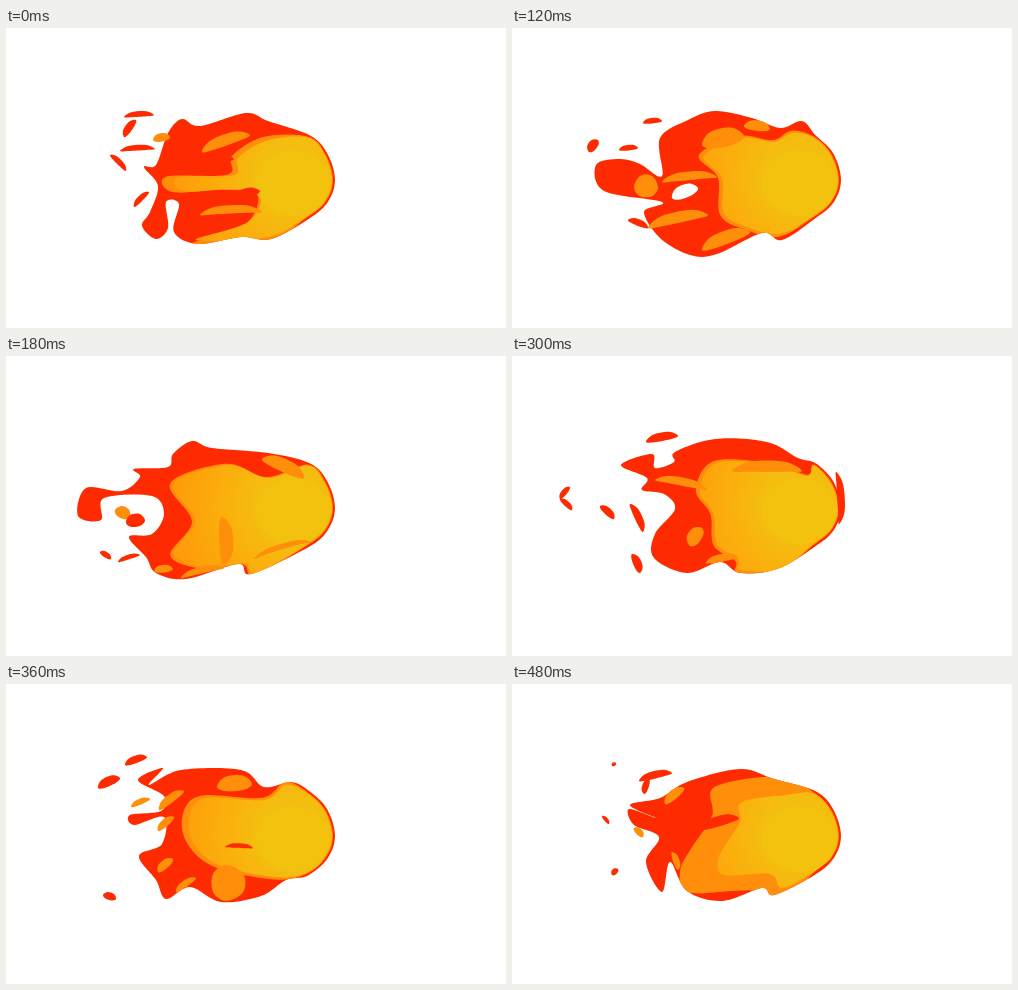
Write an HTML page that moves like this. It is 500 px wide and 300 px high and loops after 0.54 s.

```html
<!DOCTYPE html>
<html lang="en">
<head>
<meta charset="utf-8">
<title>Fireball</title>
<style>
html, body { margin: 0; width: 100%; height: 100%; overflow: hidden; background: #fff; }
svg { display: block; width: 100%; height: 100%; }
</style>
</head>
<body>
<svg viewBox="0 0 500 300">
  <defs>
    <radialGradient id="glow" gradientUnits="userSpaceOnUse" cx="288" cy="150" r="118">
      <stop offset=".3" stop-color="#f4be10"/>
      <stop offset=".6" stop-color="#fbaf0c"/>
      <stop offset="1" stop-color="#fe9d0a"/>
    </radialGradient>
  </defs>
  <g id="fire"></g>
</svg>
<script>
const STEP = 60;
const FILL = { r: '#ff2b00', o: '#ff8f0a', a: 'url(#glow)', y: '#f3c20f', w: '#fff' };
const HEART = [290, 152];

const lerp = (a, b, k) => a + (b - a) * k;
const mix = (p, q, k) => p.map((v, j) => lerp(v, q[j], k));

// Point on the rounded front that all layers share.
function nose(deg, inset) {
  const t = deg * Math.PI / 180;
  const ry = deg < 0 ? 57 : 49;
  return [262 + (67 - inset) * Math.cos(t), 152 + (ry - inset) * Math.sin(t)];
}

function points(str) {
  const n = str.split(' ').map(Number);
  return n.flatMap((x, i) => i % 2 ? [] : [[x, n[i + 1]]]);
}

// Front plus the trailing points, which run from top to bottom.
const outline = (trail, inset) => [
  ...[0, -28, -52].map(d => nose(d, inset)),
  ...trail,
  ...[54, 28].map(d => nose(d, inset))
];

// Closed smooth curve through the points.
function curve(pts) {
  const n = pts.length, at = i => pts[(i + n) % n];
  let d = 'M' + pts[0];
  for (let i = 0; i < n; i++) {
    const [p, a, b, q] = [at(i - 1), at(i), at(i + 1), at(i + 2)];
    const c1 = a.map((v, j) => v + (b[j] - p[j]) / 6);
    const c2 = b.map((v, j) => v - (q[j] - a[j]) / 6);
    d += `C${c1} ${c2} ${b}`;
  }
  return d + 'Z';
}

// Leaf from one point to another, slightly arched.
function leaf(x1, y1, x2, y2, w) {
  const dx = x2 - x1, dy = y2 - y1, len = Math.hypot(dx, dy);
  const nx = -dy / len, ny = dx / len;
  const side = (k, off) => [x1 + dx * k + nx * off, y1 + dy * k + ny * off];
  const arch = -len * .06;
  return [
    [x1, y1], side(.25, arch - w * .42), side(.75, arch - w * .42),
    [x2, y2], side(.75, arch + w * .42), side(.25, arch + w * .42)
  ];
}

// Evenly spaced points along a closed outline.
function resample(pts, count) {
  const ring = [...pts, pts[0]], len = [0];
  for (let i = 1; i < ring.length; i++) {
    len[i] = len[i - 1] + Math.hypot(ring[i][0] - ring[i - 1][0], ring[i][1] - ring[i - 1][1]);
  }
  return Array.from({ length: count }, (_, k) => {
    const s = len[len.length - 1] * k / count;
    const i = len.findIndex(l => l > s);
    return mix(ring[i - 1], ring[i], (s - len[i - 1]) / (len[i] - len[i - 1]));
  });
}

function halfway(a, b) {
  const q = resample(b, 90);
  return resample(a, 90).map((p, i) => mix(p, q[i], .5));
}

// Loose flakes trail off to the left and shrink.
function drift(pts) {
  const mid = mix(pts[0], pts[3], .5);
  if (mid[0] > 160) return pts;
  return pts.map(p => mix(mid, p, .85)).map(([x, y]) => [x - 6, y]);
}

const shape = ([fill, pts]) => `<path fill="${FILL[fill]}" d="${curve(pts)}"/>`;

function draw({ body, rim, glow, licks }) {
  return `<clipPath id="edge"><path d="${curve(body)}"/></clipPath>` +
    shape(['r', body]) +
    `<g clip-path="url(#edge)">${shape(['o', rim])}${shape(['a', glow])}` +
    `<ellipse cx="287" cy="155" rx="37" ry="33" fill="${FILL.y}"/></g>` +
    licks.map(shape).join('');
}

const poses = [];

// spread: how far the orange rim reaches beyond the glow
function pose(spread, body, glow, licks) {
  const inner = points(glow);
  poses.push({
    body: outline(points(body), 0),
    rim: outline(inner.map(p => mix(HEART, p, spread)), 2),
    glow: outline(inner, 3),
    licks: licks.split(', ').map(s => {
      const [fill, ...n] = s.split(' ');
      return [fill, leaf(...n.map(Number))];
    })
  });
}

pose(1.1,
  '262 93 240 85 194 98 176 91 162 105 150 137 138 139 152 158 144 184 136 198 150 211 162 200 160 174 173 176 168 204 192 216 235 209 265 211',
  '260 113 232 130 228 147 172 149 178 163 225 161 255 166 242 194 190 212 262 209',
  'r 218 177 254 163 12, r 180 143 228 131 10, o 194 187 256 184 9, o 196 124 244 107 12, o 147 112 164 109 9, r 118 89 148 87 6, r 118 109 130 92 8, r 114 123 149 121 6, r 104 127 120 143 6, r 128 179 143 164 6');

pose(1.05,
  '290 93 268 100 240 90 203 83 176 92 148 110 150 148 128 136 108 131 84 137 92 163 150 174 132 184 148 210 178 227 205 226 250 205 270 212',
  '280 105 262 114 230 110 192 128 210 150 212 185 235 199 268 206',
  'w 160 170 186 160 14, o 122 159 146 160 24, o 150 154 205 149 9, o 190 117 232 108 20, o 232 98 258 101 11, o 136 200 196 187 12, o 190 222 238 204 14, r 131 95 150 93 6, r 77 124 86 112 10, r 107 122 126 120 6, r 116 192 136 200 7');

pose(1.03,
  '262 97 206 92 186 85 167 98 162 111 128 113 134 121 116 135 80 132 72 160 95 164 98 142 146 140 158 158 146 178 123 181 140 201 150 217 180 223 232 208 245 218',
  '262 122 222 109 168 128 189 165 168 198 200 211 238 207 250 217',
  'o 109 154 124 161 13, r 120 167 139 164 14, o 216 161 218 209 15, o 248 203 305 186 6, o 256 103 298 122 14, o 148 215 167 213 8, o 175 222 218 212 7, r 94 196 105 203 6, r 112 206 134 199 5');

pose(1.04,
  '286 102 255 86 203 83 163 96 162 106 143 112 140 98 109 109 135 122 130 134 152 138 163 153 143 178 142 202 175 217 208 206 228 217 265 213',
  '295 120 260 109 205 107 188 135 202 158 205 188 226 203 228 214 268 213',
  'r 324 116 327 168 8, o 220 115 290 115 12, o 143 124 195 134 9, o 178 190 190 172 15, o 194 207 226 201 8, r 134 86 166 80 9, r 48 143 58 131 6, r 48 143 60 154 6, r 88 150 102 163 8, r 118 148 131 176 8, r 120 198 128 217 9');

pose(1.06,
  '285 98 258 103 235 86 175 86 143 101 157 84 132 96 158 112 155 127 124 131 128 141 158 133 156 160 133 172 150 196 160 215 184 203 215 218 255 212 280 196',
  '280 101 258 116 200 114 183 133 188 160 215 182 270 193',
  'r 219 163 247 164 5, o 211 103 246 100 17, o 153 126 178 107 9, o 152 147 168 133 8, o 152 188 167 175 9, o 170 208 190 194 7, o 220 181 220 217 36, r 119 81 141 73 8, r 92 104 114 94 10, o 125 123 144 115 6, r 97 211 110 215 8');

pose(1.45,
  '262 95 228 85 175 98 148 114 118 121 144 134 117 125 122 141 147 153 134 178 150 208 158 178 175 207 210 217 250 204 262 211',
  '275 111 230 118 228 138 214 160 206 176 212 191 258 190 270 204',
  'r 187 146 227 134 11, o 153 120 172 104 10, o 160 168 166 186 7, o 122 144 131 153 7, r 127 97 160 89 8, r 132 110 137 95 7, r 90 132 97 140 4, r 100 191 106 185 6, r 100 82 104 79 4');

const between = (a, b) => ({
  body: halfway(a.body, b.body),
  rim: halfway(a.rim, b.rim),
  glow: halfway(a.glow, b.glow),
  licks: a.licks.map(([fill, pts]) => [fill, drift(pts)])
});

// Every second pose is followed by a halfway drawing.
const drawings = poses.flatMap((p, i) => i % 2 ? [p] : [p, between(p, poses[i + 1])]).map(draw);

const fire = document.getElementById('fire');
const start = performance.now();
let shown = -1;

function render(ms) {
  const i = Math.floor(Math.max(0, ms) / STEP) % drawings.length;
  if (i !== shown) fire.innerHTML = drawings[shown = i];
}

function tick() {
  render(performance.now() - start);
  requestAnimationFrame(tick);
}
tick();
</script>
</body>
</html>
```
